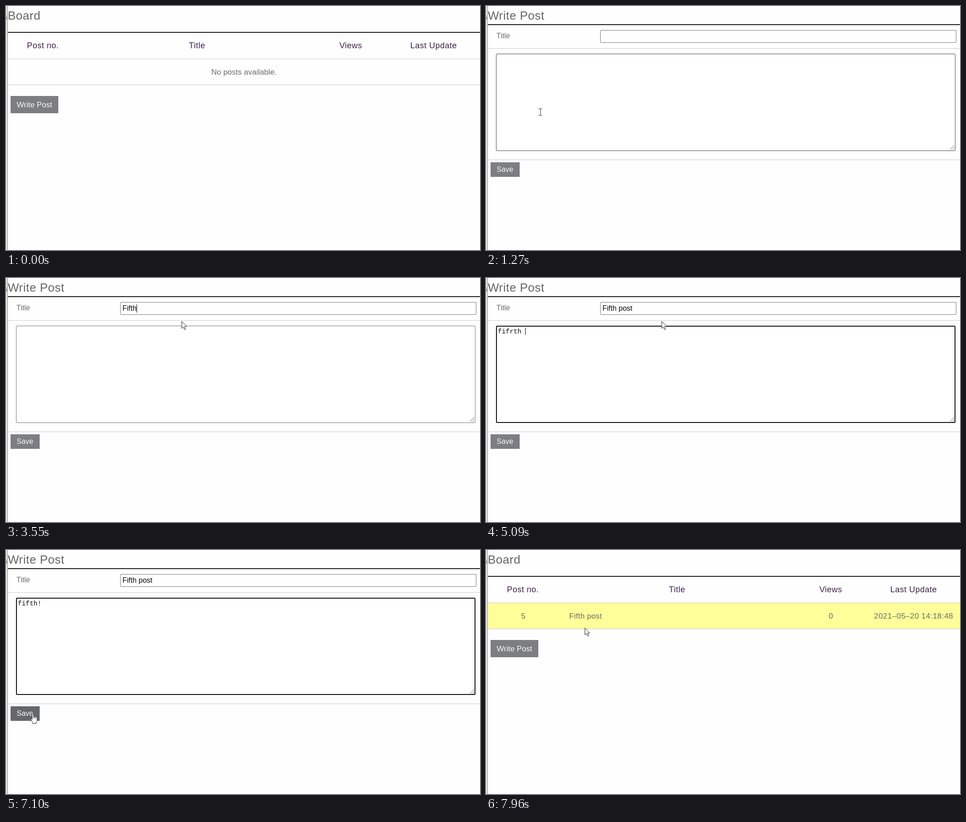
Recreate the animation shown at these times as an HTML page. Size 1042 by 537 pixels, loop 8 s.

```html
<!DOCTYPE html>
<html lang="en">
<head>
<meta charset="utf-8">
<title>Board</title>
<style>
  html, body { margin: 0; width: 100%; height: 100%; overflow: hidden; background: #fefefe; }
  svg { display: block; width: 1042px; height: 537px; }
  text { font-family: "Liberation Sans", Arial, sans-serif; font-size: 16px; fill: #6c6c6c; white-space: pre; }
  .heading { font-size: 26px; letter-spacing: .5px; fill: #626663; }
  .column { font-size: 18px; letter-spacing: .5px; fill: #3a2342; text-anchor: middle; }
  .cell { font-size: 17px; letter-spacing: .2px; }
  .center { text-anchor: middle; }
  .label { font-size: 17px; fill: #f6f6f6; }
  .typed { fill: #0a0a0a; }
  .mono { font-family: "Liberation Mono", monospace; font-size: 14.4px; }
  .rule { fill: #cbcbcb; }
  .strong { fill: #1c1a1e; }
  .field { fill: #fff; stroke: #767676; }
  .hover { stroke: #484848; }
  .focus { stroke: #101010; stroke-width: 2; }
  .button { fill: #7d7e82; }
  .button.hover { fill: #66676c; stroke: none; }
  .cursor path { fill: #fff; stroke: #222; stroke-linejoin: round; }
</style>
</head>
<body>
<svg viewBox="0 0 1042 537">
  <rect width="1042" height="537" fill="#fefefe"/>
  <rect width="3" height="537" fill="#e6e6e6"/>
  <rect y="110" width="3" height="1" fill="#cfcfcf"/>
  <text x="-5" y="30" style="fill:#66755f">s</text>
  <rect x="3" width="1" height="537" fill="#858585"/>

  <g id="board">
    <text class="heading" x="4" y="30">Board</text>
    <rect id="row" x="4" y="117" width="1038" height="56" fill="#ffff99"/>
    <rect class="strong" x="4" y="57" width="1038" height="2"/>
    <rect class="rule" x="4" y="116" width="1038" height="1"/>
    <rect class="rule" x="4" y="173" width="1038" height="1"/>
    <text class="column" x="81" y="93">Post no.</text>
    <text class="column" x="420" y="93">Title</text>
    <text class="column" x="758" y="93">Views</text>
    <text class="column" x="940" y="93">Last Update</text>
    <text id="empty" class="cell center" style="letter-spacing:0" x="523" y="151">No posts available.</text>
    <g id="post">
      <text class="cell center" x="82" y="151">5</text>
      <text class="cell" x="183" y="151">Fifth post</text>
      <text class="cell center" x="758" y="151">0</text>
      <text class="cell center" style="letter-spacing:.45px" x="940" y="151">2021–05–20 14:18:48</text>
    </g>
    <rect id="write" class="button" x="10" y="198" width="105" height="38"/>
    <text class="label" x="23.5" y="223">Write Post</text>
  </g>

  <g id="form">
    <text class="heading" x="4" y="30">Write Post</text>
    <rect class="strong" x="4" y="40" width="1038" height="2"/>
    <rect class="rule" x="4" y="93" width="1038" height="1"/>
    <rect class="rule" x="4" y="338" width="1038" height="1"/>
    <text x="23" y="71">Title</text>
    <rect id="title" class="field" x="251.5" y="53.5" width="782" height="27" rx="1.5"/>
    <text id="titleText" class="typed" x="256" y="72"></text>
    <rect id="titleCaret" y="58" width="1" height="18"/>
    <rect id="area" class="field" rx="1.5"/>
    <path d="M1019.5 316.5l10-10M1025.5 316.5l4-4" stroke="#666" fill="none"/>
    <text id="areaText" class="typed mono" x="26" y="122"></text>
    <rect id="areaCaret" y="109" width="1" height="16"/>
    <rect id="save" class="button" x="10" y="344" width="64" height="32"/>
    <text class="label" style="font-size:16px" x="23.5" y="365">Save</text>
  </g>

  <g id="cursor" class="cursor">
    <path id="arrow" d="M.5 .5V16L4 12.7L6.5 18.5L9 17.4L6.5 11.8H11Z"/>
    <path id="hand" d="M-1.5 10V2Q-1.5 .5 0 .5T1.5 2V7Q2.5 5.8 4 7.3Q5.5 6.4 6.7 8.2Q9.5 7.6 9.5 10.5V15Q9.5 18 7.5 20V22.5H-.5V20.5Q-3 17.5-4.5 13.5Q-4.5 11-1.5 13.5ZM1.5 7V11M4 7.5V11.5M6.7 8.5V12"/>
    <path id="beam" d="M-4-7.5H-1L0-6.5L1-7.5H4M-4 7.5H-1L0 6.5L1 7.5H4M0-6.5V6.5" style="fill:none"/>
  </g>
</svg>
<script>
const LOOP = 8000;
const el = Object.fromEntries([...document.querySelectorAll("[id]")].map(e => [e.id, e]));

// Each leg: first step, last step, number of steps, path.
const legs = [
  [220, 580, 6, [[682, 552], [80, 212]]],
  [1110, 1270, 3, [[80, 212], [119, 233]]],
  [1440, 1975, 8, [[119, 233], [386, 68]]],
  [2290, 2290, 1, [[386, 68], [386, 95]]],
  [6740, 7098, 6, [[386, 95], [59, 359]]],
  [7570, 7960, 6, [[59, 359], [98, 325], [160, 262], [212, 200], [217, 171]]]
];

const titleKeys = [[2990, "F"], [3140, "Fi"], [3300, "Fif"], [3450, "Fift"], [3550, "Fifth"],
  [3620, "Fifth "], [3700, "Fifth p"], [3780, "Fifth po"], [3930, "Fifth pos"], [4010, "Fifth post"]];
const areaKeys = [[4540, "f"], [4617, "fi"], [4693, "fif"], [4770, "fifr"], [4940, "fifrth"],
  [5090, "fifrth "], [5400, ""], [5470, "f"], [5550, "fi"], [5630, "fif"], [5710, "fifr"],
  [5860, "fift"], [6010, "fifth"], [6410, "fifth!"]];

const within = (v, from, to) => v >= from && v < to;
const show = (e, on) => e.style.display = on ? "" : "none";
const inside = ([x, y], left, top, right, bottom) => within(x, left, right) && within(y, top, bottom);
const typed = (keys, t) => keys.reduce((text, [at, value]) => t >= at ? value : text, "");

function along(points, p) {
  const s = p * (points.length - 1);
  const i = Math.min(Math.floor(s), points.length - 2);
  return points[i].map((v, axis) => v + (points[i + 1][axis] - v) * (s - i));
}

function pointer(t) {
  const leg = legs.filter(([start]) => t >= start).pop();
  if (!leg) return null;
  const [start, end, count, points] = leg;
  const progress = end > start ? Math.min(1, (t - start) / (end - start)) : 1;
  const step = Math.floor(progress * (count - 1) + 1e-6);
  return along(points, (step + 1) / count).map(Math.round);
}

function caret(bar, text, on, x) {
  show(bar, on);
  if (on) bar.setAttribute("x", Math.round(x + (text.textContent ? text.getComputedTextLength() : 0)));
}

function setArea(focused) {
  const inset = focused ? 1 : .5;
  const box = { x: 22 + inset, y: 105 + inset, width: 1010 - 2 * inset, height: 214 - 2 * inset };
  for (const name in box) el.area.setAttribute(name, box[name]);
  el.area.classList.toggle("focus", focused);
}

function render(t) {
  const onForm = within(t, 1040, 7340);
  const saved = t >= 7340;
  const at = pointer(t);
  const over = (...box) => at !== null && inside(at, ...box);
  const overTitle = onForm && over(251, 53, 1034, 81);
  const overArea = onForm && over(22, 105, 1032, 319);
  const overSave = onForm && over(10, 344, 74, 376);
  const overWrite = !onForm && over(10, 198, 115, 236);

  show(el.form, onForm);
  show(el.board, !onForm);
  show(el.empty, !saved);
  show(el.post, saved);
  show(el.row, saved && over(4, 117, 1042, 174));

  el.title.classList.toggle("hover", overTitle);
  el.area.classList.toggle("hover", overArea);
  el.save.classList.toggle("hover", overSave);
  el.write.classList.toggle("hover", overWrite);

  el.titleText.textContent = typed(titleKeys, t);
  el.areaText.textContent = typed(areaKeys, t);
  setArea(within(t, 4240, 7170));
  caret(el.titleCaret, el.titleText, within(t, 2050, 2510) || within(t, 2990, 4240), 256);
  caret(el.areaCaret, el.areaText, within(t, 4240, 6910), 26);

  show(el.cursor, at !== null);
  if (!at) return;
  // The old pointer shape stays until the mouse moves on the new page.
  const lingering = within(t, 1040, 1110) || within(t, 7340, 7570);
  const hand = lingering || overSave || overWrite;
  const beam = !hand && (overTitle || overArea);
  show(el.hand, hand);
  show(el.beam, beam);
  show(el.arrow, !hand && !beam);
  el.cursor.setAttribute("transform", `translate(${at[0] + (beam ? .5 : 0)} ${at[1] + (beam ? .5 : 0)})`);
}

const begin = performance.now();
function frame() {
  render((performance.now() - begin) % LOOP);
  requestAnimationFrame(frame);
}
frame();
</script>
</body>
</html>
```
